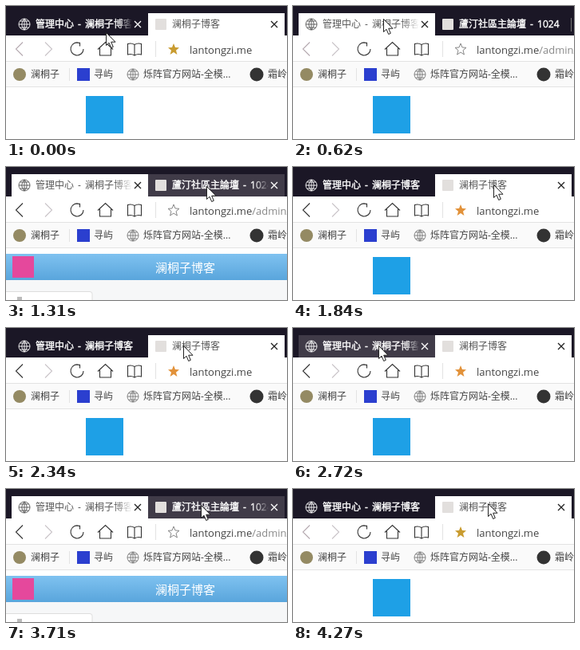
Recreate the animation shown at these times as an HTML page. Size 352 by 167 pixels, loop 4720 ms.

```html
<!DOCTYPE html>
<html lang="zh-CN">
<head>
<meta charset="utf-8">
<title>浏览器标签切换</title>
<style>
  html, body { margin: 0; width: 100%; height: 100%; overflow: hidden; background: #fff; }
  svg { display: block; width: 100%; height: 100%; }
  text { font: 12px "Open Sans", "Noto Sans CJK SC", "Noto Sans CJK", sans-serif; fill: #444; word-spacing: 2px; white-space: pre; }
  .line { fill: none; stroke: #333; stroke-width: 1.1; }
  #url { font-size: 13px; }
  #path { fill: #888; }
</style>
</head>
<body>
<svg viewBox="0 0 352 167">
  <defs>
    <linearGradient id="sky" x2="0" y2="1">
      <stop stop-color="#7fc2f0"/><stop offset="1" stop-color="#59a5dc"/>
    </linearGradient>
  </defs>

  <!-- home page -->
  <rect width="352" height="167" fill="#fff"/>
  <rect x="100" y="113" width="47" height="47" fill="#1ea0e6"/>

  <!-- admin page -->
  <g id="admin">
    <rect y="102" width="352" height="65" fill="#f6f7f8"/>
    <rect y="102" width="352" height="7" fill="#fff"/>
    <rect y="109" width="352" height="33" fill="url(#sky)"/>
    <rect x="8" y="112" width="27" height="27" fill="#e5489c"/>
    <text x="187" y="132" style="font-size:15px;fill:#fff">澜桐子博客</text>
    <rect x="-5" y="156.5" width="113" height="30" rx="3" fill="#fff" stroke="#ddd"/>
    <rect x="14" y="163" width="6" height="4" fill="#bbb"/>
  </g>

  <!-- window frame and tabs -->
  <rect width="352" height="37" fill="#1b1726"/>
  <path d="M348.500 15V32" stroke="#777"/>
  <g id="tabs"></g>

  <!-- toolbar -->
  <rect y="37" width="352" height="33" fill="#fff"/>
  <g class="line">
    <path id="back" d="M21 45.500L12.500 54L21 62.500"/>
    <path d="M49 45.500L57.500 54L49 62.500" stroke="#c9c4c8"/>
    <path d="M92 46.500A8 8 0 1 0 97 54M88 46.300H92.500V50.500"/>
    <path d="M115 54.500L124.500 45.500L134 54.500M117.500 53V62H131.500V53"/>
    <path d="M161 48.500Q157 46 152.500 47.500V61Q157 59.500 161 62Q165 59.500 169.500 61V47.500Q165 46 161 48.500V62"/>
    <path d="M187.500 44V64" stroke="#e3e3e3"/>
  </g>
  <path id="star" d="M210 47L212 52L217 52.300L213 55.700L214.400 61L210 58L205.600 61L207 55.700L203 52.300L208 52Z"/>
  <text id="url" x="230" y="59.500">lantongzi.me<tspan id="path"></tspan></text>

  <!-- bookmarks -->
  <rect y="70" width="352" height="31" fill="#fafafa"/>
  <path d="M0 69.500H352M0 101.500H352M79.500 78V94" stroke="#e3e3e3"/>
  <circle cx="17" cy="86" r="8" fill="#948a63"/>
  <rect x="89" y="78" width="16" height="16" fill="#2b3fcf"/>
  <circle cx="314" cy="86" r="8.500" fill="#333"/>
  <g id="marks"></g>

  <path id="cursor" d="M.5 .5V16.500L4 13.200L6.700 19.500L9.300 18.300L6.700 12.200H12Z" fill="#fff" stroke="#222"/>
</svg>
<script>
const LOOP = 4720;
const $ = id => document.getElementById(id);
const show = (el, on) => el.setAttribute('visibility', on ? 'visible' : 'hidden');
const globe = (x, y, ink) => `<path class="line" style="stroke:${ink};stroke-width:.9" transform="translate(${x} ${y})"
  d="M-7 0A7 7 0 1 0 7 0A7 7 0 1 0 -7 0H7M0 -7V7M0 -7Q-6.500 0 0 7Q6.500 0 0 -7M-5.500 -4H5.500M-5.500 4H5.500"/>`;

$('marks').innerHTML = globe(159, 86, '#777') +
  [[31, '澜桐子'], [110, '寻屿'], [172, '烁阵官方网站-全模...'], [328, '霜岭']]
    .map(([x, s]) => `<text x="${x}" y="90">${s}</text>`).join('');

function makeTab(x, icon) {
  const g = document.createElementNS('http://www.w3.org/2000/svg', 'g');
  const id = 'fade' + x, end = x + 151;
  g.innerHTML = `
    <linearGradient id="${id}" gradientUnits="userSpaceOnUse" x1="${end - 22}" x2="${end}" y1="0" y2="0">
      <stop/><stop offset="1" stop-opacity="0"/>
    </linearGradient>
    <rect x="${x}" y="9" width="171" height="28"/>${icon}
    <text x="${x + 30}" y="27"></text>
    <path d="M${x + 154} 19l8 8m0-8l-8 8" stroke-width="1.300"/>`;
  $('tabs').append(g);
  const [bg, label, close] = ['rect', 'text', 'path:last-child'].map(s => g.querySelector(s));
  return (title, active, hover, glow) => {
    const ink = active ? '#555' : '#fff';
    const paint = active || hover ? `url(#${id})` : ink;
    bg.setAttribute('fill', active ? '#fff' : '#403b48');
    bg.setAttribute('opacity', active ? 1 : hover ? glow : 0);
    g.querySelectorAll('stop').forEach(s => s.setAttribute('stop-color', ink));
    g.querySelectorAll('.line').forEach(p => p.style.stroke = ink);
    close.style.stroke = active ? '#222' : '#fff';
    label.textContent = title;
    label.style.fill = paint;
    label.style.stroke = active ? 'none' : paint;
    label.style.strokeWidth = .4;
    show(close, active || hover);
  };
}
const adminTab = makeTab(7, globe(23, 23, '#fff'));
const homeTab = makeTab(178, '<rect x="187" y="16" width="14" height="14" rx="1" fill="#e2dfdd"/>');

// start, end, number of steps, x, y
const moves = [
  [70, 220, 3, 113, 16],
  [690, 1090, 6, 235, 26],
  [1160, 1310, 3, 251, 24],
  [1840, 1841, 1, 251, 22],
  [2240, 2720, 7, 107, 22],
  [3090, 3490, 6, 190, 25],
  [3560, 3710, 3, 244, 20],
  [4090, 4091, 1, 244, 18]
];

function cursorAt(t) {
  let x = 125, y = 33;
  for (const [a, b, n, tx, ty] of moves) {
    if (t < a) break;
    const u = Math.min(n, Math.floor((t - a) / (b - a) * (n - 1) + 1.001)) / n;
    const e = u * u * (3 - 2 * u);
    x += (tx - x) * e;
    y += (ty - y) * e;
  }
  return [Math.round(x), Math.round(y)];
}

function draw(t) {
  const [x, y] = cursorAt(t);
  const within = (a, b) => t >= a && t < b;
  const onAdmin = within(620, 1840) || within(3020, 4090);
  const loaded = within(690, 1840) || within(3090, 4090);
  const warm = within(1840, 3020);
  const glow = Math.min(1, t / 220);

  adminTab('管理中心 - 澜桐子博客', onAdmin, x < 178, glow);
  homeTab(onAdmin ? '蘆汀社區主論壇 - 1024' : '澜桐子博客', !onAdmin, x >= 178, glow);
  show($('admin'), loaded);
  $('star').setAttribute('fill', onAdmin ? 'none' : warm ? '#e2923a' : '#c99c30');
  $('star').setAttribute('stroke', onAdmin ? '#888' : 'none');
  $('back').style.stroke = loaded || warm ? '#333' : '#b5aab0';
  $('path').textContent = onAdmin ? '/admin/' : '';
  $('cursor').setAttribute('transform', `translate(${x} ${y})`);
}

const start = performance.now();
function tick() {
  draw((performance.now() - start) % LOOP);
  requestAnimationFrame(tick);
}
tick();
</script>
</body>
</html>
```
